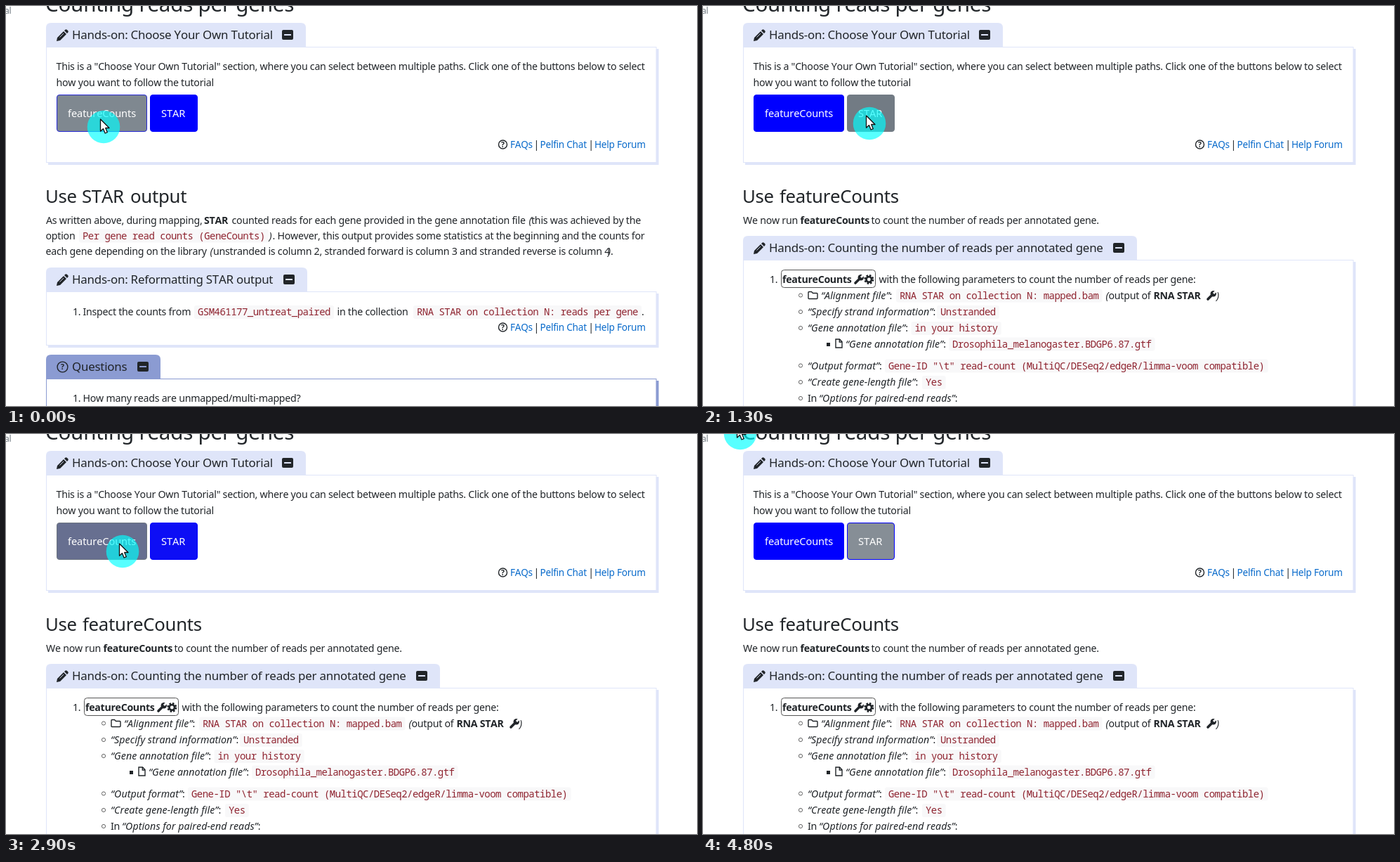
Write an HTML page that moves like this. It is 984 by 569 pixels and loops after 5000 ms.

```html
<!DOCTYPE html>
<html lang="en">
<head>
<meta charset="utf-8">
<title>Choose your own tutorial</title>
<style>
html, body { margin: 0; width: 100%; height: 100%; overflow: hidden; background: #fff; }
svg { display: block; }
text { font: 14.2px "Noto Sans", sans-serif; font-kerning: none; letter-spacing: -.25px; fill: #212529; white-space: pre; }
.h2 { font-size: 29.6px; letter-spacing: -.25px; }
.h3 { font-size: 25.8px; letter-spacing: -.3px; }
.title { font-size: 16.9px; letter-spacing: -.23px; }
.b { font-weight: 700; letter-spacing: -.3px; }
.i { font-style: italic; letter-spacing: .04px; }
.code { font: 14px "Noto Sans Mono", monospace; letter-spacing: -.525px; fill: #8f2430; }
.link { font-size: 13.6px; fill: #0a6bcb; }
.side { font-size: 12px; fill: #6c757d; }
.btn { fill: #fff; font-size: 14.6px; letter-spacing: -.1px; }
.mark { font-weight: 700; font-size: 10.5px; text-anchor: middle; letter-spacing: 0; }
.line { fill: none; stroke: #212529; stroke-width: 1.4; }
</style>
</head>
<body>
<svg id="stage" width="984" height="569" viewBox="0 0 984 569"></svg>
<script>
const PALE = '#dfe5f9', DEEP = '#8b9bd2', INK = '#212529';

// Markup helpers
const text = (x, y, s, cls = '') => `<text x="${x}" y="${y}" class="${cls}">${s}</text>`;
const at = (x, y, s) => `<g transform="translate(${x} ${y})">${s}</g>`;
const rect = (x, y, w, h, fill, r = 0, extra = '') =>
  `<rect x="${x}" y="${y}" width="${w}" height="${h}" rx="${r}" fill="${fill}" ${extra}/>`;
const code = (x, y, s) =>
  rect(x - 5, y - 14, s.length * 7.875 + 10, 19, '#f8f8f9', 3) + text(x, y, s, 'code');
const label = (x, y, s, end = ':') =>
  text(x, y, `<tspan class="i">“${s}”</tspan>${end}`);

// Icons
const pencil = (x, y) => at(x, y, `<path fill="${INK}" d="M1 12 10 3 14 7 5 16 0 17ZM11 2 12.3.7Q13.6-.4 15 .9L16.2 2.1Q17.4 3.5 16.2 4.8L15 6Z"/>
  <path d="M4.5 11.5 10 6" stroke="${PALE}" stroke-width=".9"/>`);
const minus = (x, y, bg) => rect(x, y, 16, 14, INK, 2) + rect(x + 3, y + 6, 10, 2, bg, .5);
const question = (x, y, r) =>
  `<circle class="line" cx="${x}" cy="${y}" r="${r}"/>` + text(x, y + 3.8, '?', 'mark');
const wrench = (x, y) => at(x, y, `<path d="M2 12 8 6" stroke="${INK}" stroke-width="3.6" stroke-linecap="round"/>
  <circle cx="9.8" cy="4.2" r="4.2" fill="${INK}"/><path d="M10 4 15-1" stroke="#fff" stroke-width="3"/>`);
const cog = (x, y) => `<g fill="none" stroke="${INK}" stroke-width="2.8">
  <circle cx="${x}" cy="${y}" r="3.8"/><circle cx="${x}" cy="${y}" r="5.6" stroke-dasharray="2.4 2"/></g>`;
const folder = (x, y) => at(x, y, '<path class="line" d="M1 2Q1 1 2 1H5.5L7.5 3H13Q14 3 14 4V10Q14 11 13 11H2Q1 11 1 10Z"/>');
const file = (x, y) => at(x, y, '<path class="line" d="M1 1H6.5L10 4.5V13H1ZM6.3 1V5H10"/>');
const ring = y => `<circle cx="139" cy="${y}" r="2.6" fill="none" stroke="#555" stroke-width=".9"/>`;

// A box with a tab on top
function box(y, h, tabW, color = PALE) {
  return `<path fill="${color}" d="M57 ${y + 1}V${y - 27}q0-7 7-7H${50 + tabW}q7 0 7 7V${y + 1}Z"/>`
    + rect(60, y + 3, 869.5, h, color)
    + rect(57.5, y + .5, 868.5, h - 1, '#fff', 0, `stroke="${color}"`);
}
const handsOn = (y, h, tabW, title) => box(y, h, tabW) + pencil(72, y - 25)
  + text(94, y - 11, title, 'title') + minus(57 + tabW - 34, y - 24, PALE);

const links = y => question(707.5, y - 5, 6) + text(718, y, 'FAQs', 'link') + text(751.5, y, '|')
  + text(760.5, y, 'Pelfin Chat', 'link') + text(829.3, y, '|') + text(838, y, 'Help Forum', 'link');

const button = (id, x, w, tx, s) =>
  `<rect id="${id}" x="${x + .5}" y="126.5" width="${w - 1}" height="52" rx="3.5"/>` + text(tx, 158, s, 'btn');

const header = text(-2, 11, 'al', 'side') + text(56, 8, 'Counting reads per genes', 'h2')
  + handsOn(58, 165, 370, 'Hands-on: Choose Your Own Tutorial')
  + text(71.5, 91, 'This is a "Choose Your Own Tutorial" section, where you can select between multiple paths. Click one of the buttons below to select')
  + text(71.5, 113.5, 'how you want to follow the tutorial')
  + button('feature', 72, 129, 88, 'featureCounts') + button('star', 205, 68, 221, 'STAR')
  + links(202) + text(56, 280, 'Use', 'h3');

const starPage = text(108, 280, 'STAR', 'h3') + text(177, 280, 'output', 'h3')
  + text(57, 309.5, 'As written above, during mapping,') + text(282, 309.5, 'STAR', 'b')
  + text(321.5, 309.5, 'counted reads for each gene provided in the gene annotation file')
  + text(744.5, 309.5, '(', 'i') + text(748, 309.5, 'this was achieved by the')
  + text(56.5, 331.5, 'option') + code(109, 331.5, 'Per gene read counts (GeneCounts)')
  + text(374.5, 331.5, ')', 'i')
  + text(379.5, 331.5, '. However, this output provides some statistics at the beginning and the counts for')
  + text(56.5, 354, 'each gene depending on the library') + text(290.5, 354, '(', 'i')
  + text(295, 354, 'unstranded is column 2, stranded forward is column 3 and stranded reverse is column 4')
  + text(857, 354, ')', 'i') + text(861, 354, '.')
  + handsOn(406, 77, 372, 'Hands-on: Reformatting STAR output')
  + text(95, 440, '1.') + text(109.5, 440, 'Inspect the counts from')
  + code(273, 440, 'GSM461177_untreat_paired') + text(471.5, 440, 'in the collection')
  + code(585, 440, 'RNA STAR on collection N: reads per gene') + text(905, 440, '.')
  + links(462)
  + box(530, 60, 163, DEEP) + question(80.5, 513.5, 7.4) + text(94, 519, 'Questions', 'title')
  + minus(187, 506, DEEP)
  + text(95, 563, '1.') + text(109.5, 563, 'How many reads are unmapped/multi-mapped?');

const featurePage = text(109, 280, 'featureCounts', 'h3')
  + text(57, 309.5, 'We now run') + text(138.5, 309.5, 'featureCounts', 'b')
  + text(239.5, 309.5, 'to count the number of reads per annotated gene.')
  + handsOn(361, 240, 561, 'Hands-on: Counting the number of reads per annotated gene')
  + text(95, 394, '1.') + rect(111.5, 375.5, 134, 25, '#fff', 4, 'stroke="#555"')
  + text(113, 394, 'featureCounts', 'b') + wrench(215, 382) + cog(236.3, 389)
  + text(250.5, 394, 'with the following parameters to count the number of reads per gene:')
  + [411.5, 435, 458, 511.5, 535, 558].map(ring).join('')
  + folder(149, 405.5) + label(168, 416.5, 'Alignment file')
  + code(280, 416.5, 'RNA STAR on collection N: mapped.bam')
  + text(573.5, 416.5, '(', 'i') + text(577.5, 416.5, 'output of')
  + text(641.5, 416.5, 'RNA STAR', 'b') + wrench(717, 405) + text(731, 416.5, ')', 'i')
  + label(149, 440, 'Specify strand information') + code(338, 440, 'Unstranded')
  + label(149, 463, 'Gene annotation file') + code(301.5, 463, 'in your history')
  + rect(176, 479, 5, 5, INK) + file(188, 473) + label(203, 485.5, 'Gene annotation file')
  + code(355, 485.5, 'Drosophila_melanogaster.BDGP6.87.gtf')
  + label(149, 516.5, 'Output format')
  + code(264, 516.5, 'Gene-ID "\\t" read-count (MultiQC/DESeq2/edgeR/limma-voom compatible)')
  + label(149, 540, 'Create gene-length file') + code(317, 540, 'Yes')
  + text(149, 563, 'In') + label(165, 563, 'Options for paired-end reads');

const pointer = `<g id="pointer"><circle r="23.3" fill="#0ff" fill-opacity=".66"/>
  <path transform="translate(-4.5 -11)" fill="#fff" stroke="#111" stroke-width="1.3" stroke-linejoin="round"
  d="M0 0V17.2L4 13.6 6.6 20 9.8 18.7 7.2 12.5H12.5Z"/></g>`;

const $ = id => document.getElementById(id);
$('stage').innerHTML = header + `<g id="starPage">${starPage}</g><g id="featurePage">${featurePage}</g>` + pointer;

// Motion
const PATH = [[0, 139, 172], [700, 139, 172], [1000, 172, 167], [1300, 237, 167], [2200, 237, 167],
  [2400, 180, 167], [2500, 180, 167], [2600, 166, 167], [4200, 166, 167], [4800, 53, -1], [5000, 53, -1]];
const BLUE = [0, 0, 255], GRAY = [134, 142, 150], GRAY_HOVER = [114, 123, 132], DARK = [70, 75, 90];

const ramp = (t, from, d) => Math.min(1, Math.max(0, (t - from) / d));
const mix = (a, b, k) => a.map((v, i) => v + (b[i] - v) * k);
const rgb = c => `rgb(${c.map(Math.round)})`;

function paint(id, gray, hover) {
  const el = $(id);
  el.setAttribute('fill', rgb(mix(BLUE, mix(GRAY, GRAY_HOVER, hover), gray)));
  el.setAttribute('stroke', rgb(mix(BLUE, mix(DARK, GRAY_HOVER, gray), hover)));
}

function draw(now) {
  const t = Math.floor(now % 5000 / 100) * 100;
  const gray = 1 - ramp(t, 500, 200) + ramp(t, 1780, 200) - ramp(t, 2880, 200);
  const onFeature = ramp(t, -50, 150) - ramp(t, 1050, 150) + ramp(t, 2250, 150) - ramp(t, 4450, 150);
  const onStar = ramp(t, 1050, 150) - ramp(t, 2500, 100);
  paint('feature', gray, onFeature);
  paint('star', 1 - gray, onStar);

  const showStar = t < 500 || (t >= 1800 && t < 2900);
  $('starPage').style.display = showStar ? '' : 'none';
  $('featurePage').style.display = showStar ? 'none' : '';

  const i = PATH.findIndex(p => p[0] > t);
  const [a, b] = [PATH[i - 1], PATH[i]];
  const [, x, y] = mix(a, b, (t - a[0]) / (b[0] - a[0]));
  $('pointer').setAttribute('transform', `translate(${x} ${y})`);
}

const start = performance.now();
(function loop() {
  draw(performance.now() - start);
  requestAnimationFrame(loop);
})();
</script>
</body>
</html>
```
